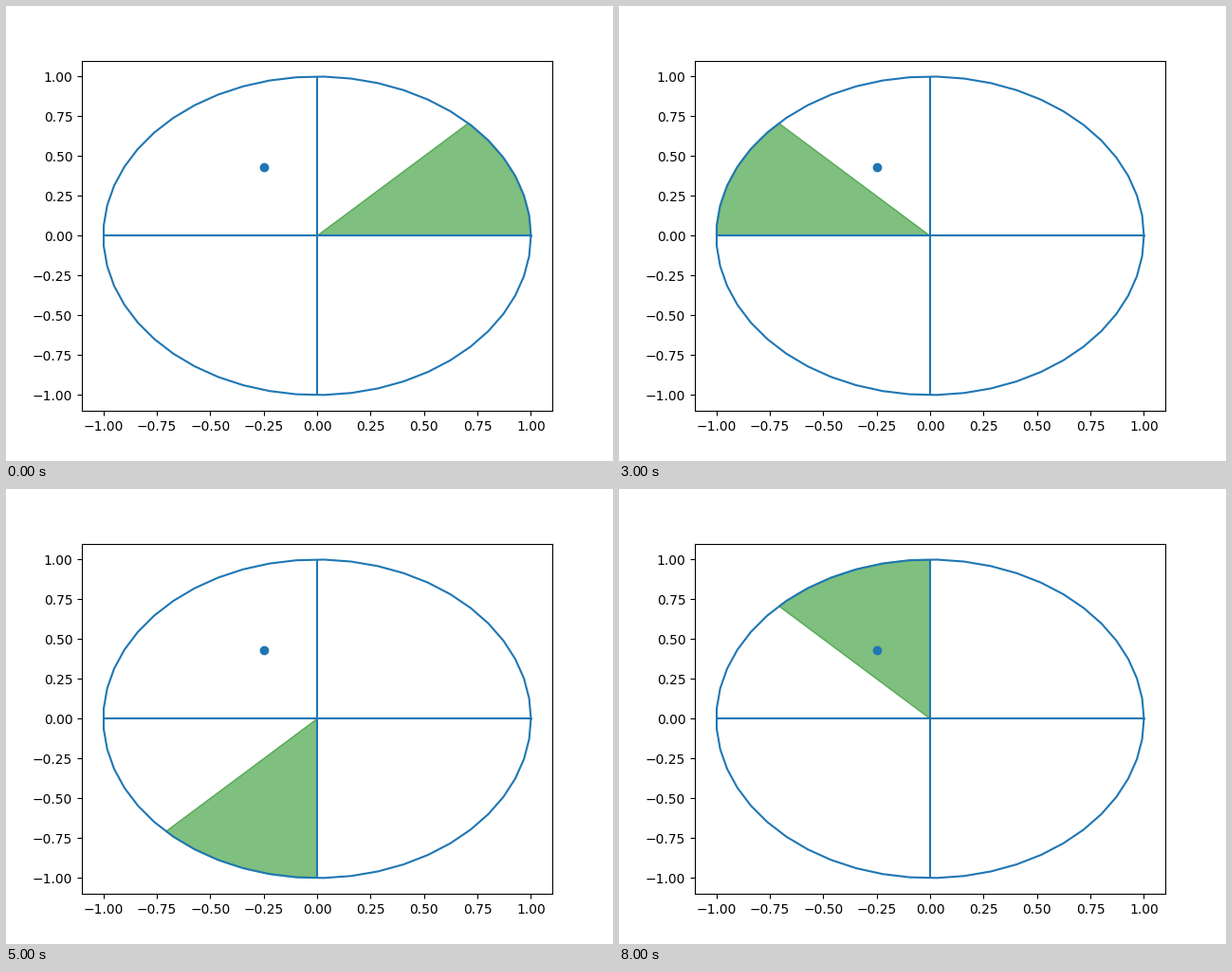
A matplotlib script for the animation above (9.5 s loop, 640 by 480 pixels).

```python
import numpy as np
import matplotlib.pyplot as plt
from matplotlib.animation import FuncAnimation
from matplotlib.patches import Wedge

SECTORS = 8
STEP = 360 / SECTORS
TICK_MS = 500
TICKS = 19
TICKS_PER_SECTOR = 2

point = 0.5 * np.cos(2 * np.pi / 3), 0.5 * np.sin(2 * np.pi / 3)
found = int(np.degrees(np.arctan2(point[1], point[0])) // STEP)

fig, ax = plt.subplots(figsize=(6.4, 4.8), dpi=100)
wedge = ax.add_patch(Wedge((0, 0), 1, 0, STEP, color="g", alpha=0.5))

angle = np.linspace(0, 2 * np.pi, 50)
ax.plot(np.cos(angle), np.sin(angle), color="C0")
ax.hlines(0, -1, 1, colors="C0")
ax.vlines(0, -1, 1, colors="C0")
ax.scatter(*point, color="C0")
ax.set(xlim=(-1.1, 1.1), ylim=(-1.1, 1.1))


def update(tick):
    """Sweep all sectors once, then rest on the one holding the point."""
    sector = tick // TICKS_PER_SECTOR
    if sector >= SECTORS:
        sector = found
    wedge.set_theta1(sector * STEP)
    wedge.set_theta2((sector + 1) * STEP)
    return (wedge,)


anim = FuncAnimation(fig, update, frames=TICKS, interval=TICK_MS,
                     repeat=True, repeat_delay=0, blit=False)
plt.show()
```
